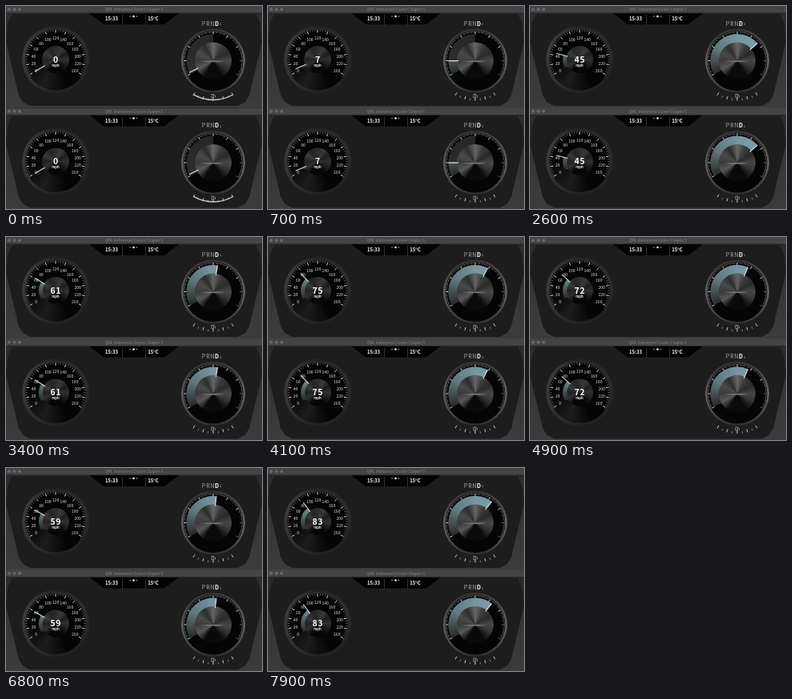
Recreate the animation shown at these times as an HTML page with a canvas. Size 320 by 254 pixels, loop 8 s.

```html
<!DOCTYPE html>
<html lang="en">
<head>
<meta charset="utf-8">
<title>Instrument cluster</title>
<style>
html, body { margin: 0; width: 100%; height: 100%; overflow: hidden; background: #1c1c1c; }
canvas { display: block; }
</style>
</head>
<body>
<canvas id="stage" width="320" height="254"></canvas>
<script>
const ctx = document.getElementById('stage').getContext('2d');
const LOOP = 8000;
const FONT = '"Noto Sans CJK SC", "Noto Sans CJK JP", "Noto Sans", sans-serif';
const START = -120; // dial angles are degrees clockwise from the top
const SHIFT_SPEED = 51;

// [ms, mph]
const speedKeys = [[0, 0], [350, 0], [700, 7], [1900, 31], [3400, 61], [4370, 80.5],
  [4900, 72], [6300, 49.5], [6400, 49.5], [6800, 59], [7900, 83], [8000, 83]];

function speedAt(t) {
  let i = 1;
  while (i < speedKeys.length - 1 && t > speedKeys[i][0]) i++;
  const [x0, y0] = speedKeys[i - 1], [x1, y1] = speedKeys[i];
  return y0 + (y1 - y0) * (t - x0) / (x1 - x0);
}

// Revs climb steeply in low gear and drop back at the shift
const revAngle = speed => START + (speed < SHIFT_SPEED ? 4 + 3.67 * speed : 50 + 1.3 * speed);

const rad = deg => (deg - 90) * Math.PI / 180;

function poly(points, fill) {
  ctx.beginPath();
  points.forEach(p => ctx.lineTo(...p));
  ctx.closePath();
  ctx.fillStyle = fill;
  ctx.fill();
}

function disc(x, y, r, fill) {
  ctx.beginPath();
  ctx.arc(x, y, r, 0, 7);
  ctx.fillStyle = fill;
  ctx.fill();
}

function arc(r, from, to, color, width) {
  ctx.beginPath();
  ctx.arc(0, 0, r, rad(from), rad(to));
  ctx.strokeStyle = color;
  ctx.lineWidth = width;
  ctx.stroke();
}

function spoke(deg, r0, r1, color, width) {
  const c = Math.cos(rad(deg)), s = Math.sin(rad(deg));
  ctx.beginPath();
  ctx.moveTo(c * r0, s * r0);
  ctx.lineTo(c * r1, s * r1);
  ctx.strokeStyle = color;
  ctx.lineWidth = width;
  ctx.stroke();
}

function text(str, x, y, size, color = '#fff', weight = 400) {
  ctx.font = `${weight} ${size}px ${FONT}`;
  ctx.fillStyle = color;
  ctx.fillText(str, x, y);
}

function addStops(gradient, colors) {
  colors.forEach((c, i) => gradient.addColorStop(i / (colors.length - 1), c));
  return gradient;
}

const linear = (x0, y0, x1, y1, ...colors) =>
  addStops(ctx.createLinearGradient(x0, y0, x1, y1), colors);

const conic = (start, ...colors) =>
  addStops(ctx.createConicGradient(rad(start), 0, 0), colors);

// Band whose colour depends on the dial position: dark at the start, teal higher up
function sweep(r, width, end) {
  arc(r, START, end, conic(START, '#2a2a29', '#5f777b', '#7595a0', '#7d9fa6', '#7d9fa6', '#7d9fa6', '#7d9fa6'), width);
}

function backdrop() {
  ctx.fillStyle = linear(0, 9, 0, 127, '#2b2b2b', '#363636', '#3c3c3c');
  ctx.fillRect(0, 9, 320, 118);
  poly([[8, 10], [312, 10], [318, 22], [320, 45], [304, 112], [299, 120], [290, 125],
    [30, 125], [21, 120], [16, 112], [0, 45], [2, 22]], '#1d1d1d');
  poly([[104, 9], [216, 9], [198, 23], [122, 23]], '#030303');
  ctx.fillStyle = '#444';
  ctx.fillRect(145, 11, .7, 13);
  ctx.fillRect(174, 11, .7, 13);
  text('15:33', 132, 16, 6, '#fff', 700);
  text('15°C', 184, 16, 6, '#fff', 700);
  disc(155, 13, .8, '#aaa');
  disc(159.5, 13, 1.3, '#fff');
  disc(163.5, 13, .8, '#aaa');
}

function titleBar() {
  ctx.fillStyle = '#444';
  ctx.fillRect(0, 0, 320, 9);
  ctx.fillStyle = '#222';
  ctx.fillRect(0, 8.5, 320, .7);
  [4, 10.5, 17].forEach(x => disc(x, 4.3, 2, '#686868'));
  text('QML Instrument Cluster Chapter 5', 160, 4.3, 4.6, '#888');
}

function speedometer(speed) {
  const angle = START + speed;
  ctx.save();
  ctx.translate(62, 67);
  disc(0, 0, 42, conic(0, '#222', '#2c2c2c', '#222', '#222', '#333', '#3c3c3c', '#222'));
  disc(0, 0, 38.5, conic(0, '#050505', '#050505', '#050505', '#050505', '#1c1c1c', '#080808', '#050505', '#050505'));
  arc(38.2, -125, 125, '#555', .6);
  for (let i = 0; i <= 48; i++) {
    const major = i % 4 === 0;
    spoke(i * 5 + START, major ? 33.5 : 35.3, 37.2, major ? '#eee' : '#aaa', major ? .9 : .55);
  }
  disc(0, 0, 17, conic(0, '#2c2c2c', '#383838', '#1c1c1c', '#303030', '#1c1c1c', '#060606',
    '#060606', '#060606', '#303030', '#222', '#3a3a3a', '#242424', '#2c2c2c'));
  sweep(18.5, 5, angle);
  for (let i = 0; i <= 12; i++) {
    const a = rad(i * 20 + START);
    text(i === 12 ? 260 : i * 20, Math.cos(a) * 28, Math.sin(a) * 27 + .3, 5, '#ddd');
  }
  spoke(angle, 15.5, 30, '#cfdde0', 1.1);
  ctx.letterSpacing = '.4px';
  text(Math.round(speed), .2, -.2, 10.5, '#fff', 700);
  ctx.letterSpacing = '0px';
  text('mph', 0, 7.2, 4.2, '#fff', 700);
  ctx.restore();
}

function revCounter(angle) {
  disc(0, 0, 40, conic(0, '#333', '#484848', '#666', '#444', '#2b2b2b', '#444', '#606060', '#3c3c3c', '#333'));
  disc(0, 0, 37.5, '#050505');
  arc(36.4, START, -START, '#777', .6);
  for (let i = 0; i <= 32; i++) {
    const major = i % 4 === 0;
    const color = i > 26 ? '#94594c' : major ? '#eee' : '#999';
    spoke(i * 7.5 + START, major ? 33 : 34.8, 36.4, color, major ? .9 : .5);
  }
  arc(28, START, 0, conic(START, '#2e2e2e', '#262626', '#050505', '#050505'), 11);
  sweep(28, 11, angle);
  disc(0, 0, 23, conic(0, '#666', '#3a3a3a', '#2a2a2a', '#484848', '#303030', '#0a0a0a',
    '#0a0a0a', '#0a0a0a', '#585858', '#3a3a3a', '#4a4a4a', '#2c2c2c', '#666'));
  ctx.fillStyle = linear(-19, 0, 17, 0, '#333', '#777', '#777', '#333');
  ctx.fillRect(-19, 0, 36, 1.6);
  spoke(angle, 21, 33.5, '#dfe9eb', 1.1);
}

function fuelGauge(t) {
  for (let i = -4; i <= 4; i++) {
    spoke(180 + i * 7.5, i % 2 ? 47.5 : 46, 50, '#ccc', i % 2 ? .6 : 1);
  }
  const fill = Math.max(0, 1 - t / 650);
  if (fill) arc(49, 210 - 60 * fill, 210, '#ccc', 1.3);
  ctx.strokeStyle = '#aaa';
  ctx.lineWidth = .7;
  ctx.strokeRect(-2, 42, 2.6, 4);
  ctx.beginPath();
  ctx.moveTo(1, 42.5);
  ctx.lineTo(2.5, 43.5);
  ctx.lineTo(2.5, 46);
  ctx.stroke();
}

function cluster(t) {
  const speed = speedAt(t);
  backdrop();
  titleBar();
  speedometer(speed);
  ctx.save();
  ctx.translate(259, 68.5);
  revCounter(revAngle(speed));
  fuelGauge(t);
  ctx.restore();
  ['P', 'R', 'N'].forEach((s, i) => text(s, 247 + i * 5.5, 22, 7, '#aaa'));
  text('D', 263.5, 22, 7, '#fff', 700);
  text('1', 268, 22.6, 3.8, '#ccc');
}

function draw(now) {
  const t = now % LOOP;
  ctx.textAlign = 'center';
  ctx.textBaseline = 'middle';
  [0, 127.5].forEach(y => {
    ctx.save();
    ctx.translate(0, y);
    cluster(t);
    ctx.restore();
  });
  requestAnimationFrame(draw);
}
requestAnimationFrame(draw);
</script>
</body>
</html>
```
